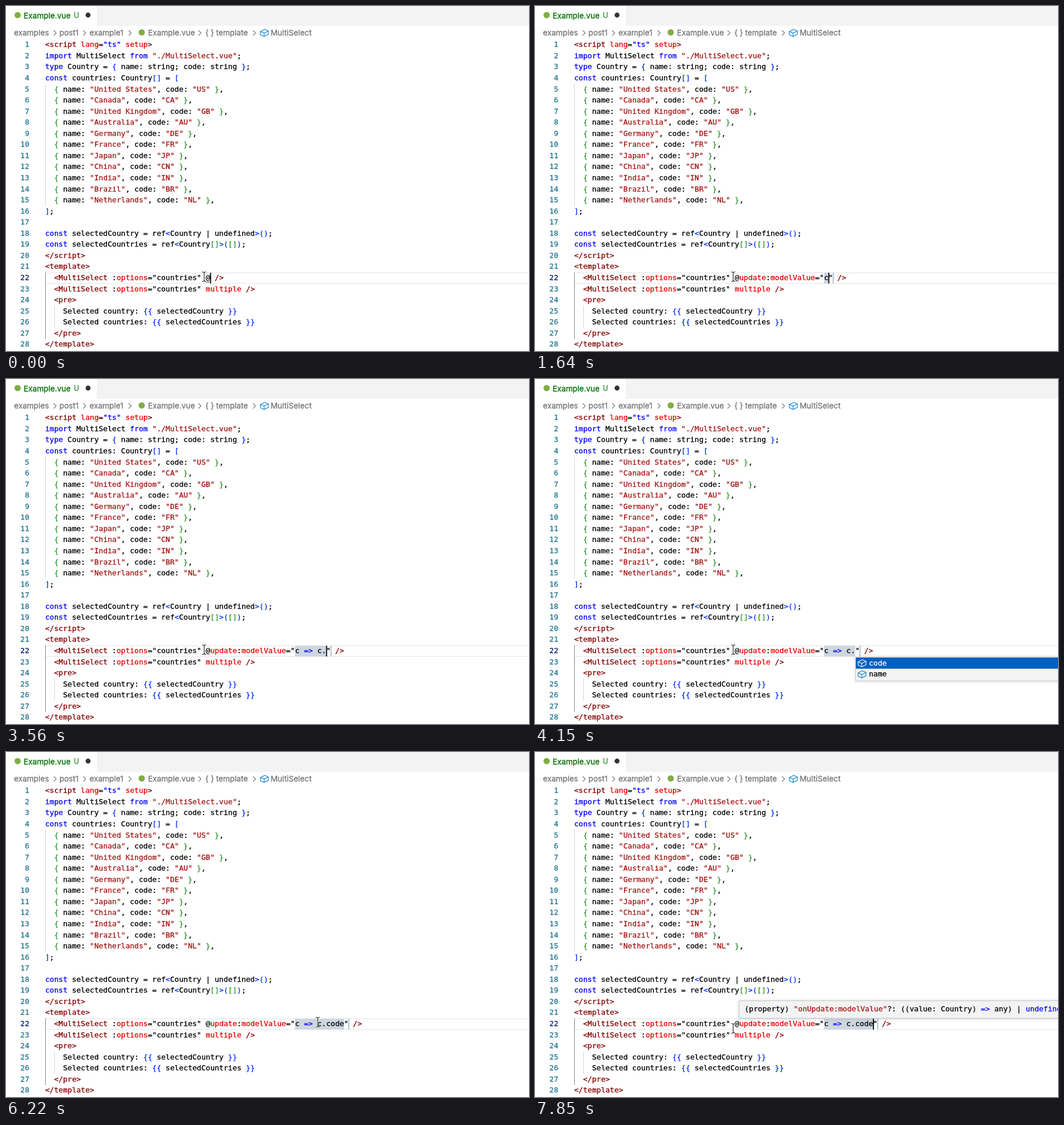
These frames come from a looping animation (921 px wide and 608 px high, 8 s). An HTML page with a canvas:

```html
<!DOCTYPE html>
<html lang="en">
<head>
<meta charset="utf-8">
<title>Code editor</title>
<style>
html, body { margin: 0; width: 100%; height: 100%; overflow: hidden; background: #fff; }
canvas { display: block; }
</style>
</head>
<body>
<canvas id="stage" width="921" height="608"></canvas>
<script>
const g = document.getElementById("stage").getContext("2d");
const LOOP = 8000, PITCH = 19.556, LEFT = 69, SIZE = 13.05, BASE = 13.5;
const MONO = `${SIZE}px "DejaVu Sans Mono", monospace`;
const UI = '13.7px Inter, sans-serif';
const CW = SIZE * .602;
const colX = c => LEFT + c * CW;
const rowY = n => 58.8 + (n - 1) * PITCH;

// "~x" inside a string switches to colour x; h and H are bold
const COLORS = {
  k: "#000", b: "#0000ff", s: "#a31515", t: "#800000", r: "#e50000",
  p: "#0431fa", g: "#319331", w: "#fff", h: "#0066bf", H: "#bbe7ff"
};

const countries = [
  ["United States", "US"], ["Canada", "CA"], ["United Kingdom", "GB"], ["Australia", "AU"],
  ["Germany", "DE"], ["France", "FR"], ["Japan", "JP"], ["China", "CN"],
  ["India", "IN"], ["Brazil", "BR"], ["Netherlands", "NL"]
];
const tagStart = '  ~t<MultiSelect ~k:~roptions~k="countries" ';
const lines = [
  '~t<script ~rlang~k=~b"ts" ~rsetup~t>',
  '~bimport~k MultiSelect ~bfrom ~s"./MultiSelect.vue"~k;',
  '~btype~k Country = ~p{~k name: string; code: string ~p}~k;',
  '~bconst~k countries: Country~p[]~k = ~p[',
  ...countries.map(([name, code]) => `  ~g{~k name: ~s"${name}"~k, code: ~s"${code}"~k ~g}~k,`),
  '~p]~k;',
  '',
  '~bconst~k selectedCountry = ref~p<~kCountry | undefined~p>()~k;',
  '~bconst~k selectedCountries = ref~p<~kCountry~g[]~p>(~g[]~p)~k;',
  '~t<\/script>',
  '~t<template>',
  '',
  tagStart + '~rmultiple~t />',
  '  ~t<pre>',
  '    Selected country: ~p{{~k selectedCountry ~p}}',
  '    Selected countries: ~p{{~k selectedCountries ~p}}',
  '  ~t</pre>',
  '~t</template>'
];

// Timelines: [start ms, value]
const attr = [[0, ""], [150, "u"], [300, "up"], [450, "upd"], [600, "upda"], [750, "updat"], [1190, null]];
const expr = [[0, ""], [1640, "c"], [2370, "c "], [2670, "c ="], [2960, "c =>"], [3110, "c => "],
  [3260, "c => c"], [3560, "c => c."], [5480, "c => c.code"]];
const caretOn = [[0, 1], [4150, 0], [4600, 1], [5190, 0], [5480, 1], [6080, 0], [6660, 1], [7110, 0], [7700, 1]];
const tabError = [[0, 0], [300, 1], [1340, 0]];
const mouse = [[0, [349, 477]], [4740, [400, 486]], [4890, [490, 502]], [5040, [560, 515]], [5190, [585, 520]],
  [5330, [588, 510]], [5480, [589, 505]], [5630, [589, 503]], [5780, [585, 498]], [5930, [572, 488]],
  [6080, [556, 479]], [6220, [549, 476]], [7110, [540, 477]], [7260, [470, 480]], [7400, [400, 484]],
  [7550, [360, 486]], [7700, [349, 487]]];
const popups = [
  [0, null],
  [900, { x: 401, w: 467, icon: bolt, tint: "#d67e00",
    items: ["~H@updat~we:modelValue", "~h@~kvnode~hUpdat~ked", "~h@~kvnodeBefore~hUpdat~ke"] }],
  [1190, null],
  [2230, { x: 517, w: 470, icon: cube, tint: "#007acc",
    items: ["~Hc~wallOnce", "~hc~kallOnce", "~hc~kancelIdleCallback", "~hc~kancelIdleCallback",
      "~hc~klearError", "~hc~klearError"] }],
  [2370, null],
  [3860, { x: 564, w: 470, icon: cube, tint: "#007acc", items: ["~wcode", "~kname"] }],
  [5480, null]
];
const hovers = [
  [0, null],
  [6510, { x: 548, w: 195, text: "(parameter) c: Country" }],
  [7110, null],
  [7700, { x: 359, w: 600,
    text: '(property) ~s"onUpdate:modelValue"~k?: ((value: Country) ~b=>~k any) | ~bundefined' }]
];
const at = (steps, t) => steps.findLast(s => s[0] <= t)[1];

// The hairline outline gives the slightly heavy text smoothing of the editor
function label(s, x, y, color, font = UI) {
  g.font = font;
  g.fillStyle = g.strokeStyle = color;
  g.lineWidth = .3;
  g.fillText(s, x, y);
  g.strokeText(s, x, y);
}

function code(s, x, y) {
  ("~k" + s).split("~").slice(1).forEach(run => {
    const c = run[0], str = run.slice(1);
    label(str, x, y, COLORS[c], (/h/i.test(c) ? "bold " : "") + MONO);
    x += str.length * CW;
  });
}

function rect(x, y, w, h, color) {
  g.fillStyle = color;
  g.fillRect(x, y, w, h);
}

function disc(x, y, r, color) {
  g.fillStyle = color;
  g.beginPath();
  g.arc(x, y, r, 0, 7);
  g.fill();
}

function path(d, x, y, stroke, width = 1.1, fill) {
  const p = new Path2D(d);
  g.save();
  g.translate(x, y);
  if (fill) { g.fillStyle = fill; g.fill(p); }
  g.strokeStyle = stroke;
  g.lineWidth = width;
  g.lineJoin = "round";
  g.stroke(p);
  g.restore();
}

function cube(x, y, color) {
  path("M1 5.5L8.5 1.8L15 4.5V10.5L7.5 14.3L1 11.3ZL7.5 8.3L15 4.5M7.5 8.3V14.3", x, y, color);
}

function bolt(x, y, color) {
  path("M6 1.5H11L8.6 6H12L4 14.5L6 9H3Z", x, y, color);
}

function panel(x, y, w, h) {
  g.save();
  g.shadowColor = "rgba(0,0,0,.16)";
  g.shadowBlur = 6;
  rect(x, y, w, h, "#f3f3f3");
  g.restore();
  g.strokeStyle = "#c8c8c8";
  g.lineWidth = 1;
  g.strokeRect(x + .5, y + .5, w - 1, h - 1);
}

function header(error) {
  const tabW = error ? 173 : 160, ink = error ? "#b01011" : "#007100";
  rect(0, 0, 921, 35, "#f3f3f3");
  rect(0, 0, tabW, 35, "#fff");
  disc(20.5, 16, 5.5, "#7fae42");
  label("Example.vue", 31, 21.5, ink);
  g.globalAlpha = .75;
  label(error ? "1, U" : "U", 119.5, 21, ink, "12.5px Inter, sans-serif");
  g.globalAlpha = 1;
  disc(tabW - 15.5, 16, 4.4, "#333");

  const grey = "#767676";
  [["examples", 14], ["post1", 94], ["example1", 147], ["Example.vue", 250], ["template", 370],
    ["MultiSelect", 466], ["{", 351], ["}", 360.5]].forEach(([s, x]) => label(s, x, 52.3, grey));
  for (const x of [86, 138, 218, 341, 437]) path("M-2 -4.5L2.5 0L-2 4.5", x, 47.5, grey);
  disc(239, 46.5, 5.5, "#7fae42");
  cube(447, 39.5, "#007acc");
}

function pointer(x, y, hand) {
  if (!hand) {
    const beam = "M-3.5 -8.5Q0 -8.5 0 -6Q0 -8.5 3.5 -8.5M0 -6V6M-3.5 8.5Q0 8.5 0 6Q0 8.5 3.5 8.5";
    path(beam, x, y, "#fff", 2.6);
    path(beam, x, y, "#222", 1.2);
    return;
  }
  path("M-3.5 1V-6Q-2.5 -8 -1 -6V-2Q.5 -3.2 1.8 -1.8Q3.2 -2.6 4.3 -1Q6 -1.6 6.6 .4V4Q6.4 6 5 7.5V9H-2V7.5" +
    "Q-4.5 4.5 -6.5 1.5Q-6 -.8 -3.5 1ZM-1 -2V1.5M1.8 -1.5V1.8M4.3 -.8V2", x, y, "#000", 1.1, "#fff");
}

function editor(t) {
  const top = rowY(22), typed = at(attr, t), value = at(expr, t);
  const full = typed === null;
  const plain = full ? `@update:modelValue="${value}` : "@" + typed;
  const caretX = colX(36 + plain.length);

  rect(LEFT, top, 852, 1.5, "#ececec");
  rect(LEFT, top + 18.8, 852, 1.5, "#ececec");
  rect(69, rowY(5), 1, PITCH * 11, "#d3d3d3");
  rect(69, top, 1, PITCH * 6, "#838383");
  rect(85, rowY(25), 1, PITCH * 2, "#d3d3d3");
  if (full) {
    rect(colX(56), top + .5, value.length * CW, 19, "#ced6e0");
    rect(caretX + CW, top + .5, 1, 19, "#738aa6");
  }

  lines.forEach((line, i) => {
    const n = i + 1, y = rowY(n) + BASE;
    code(line, LEFT, y);
    g.textAlign = "right";
    label(n, 41, y, n == 22 ? "#0b216f" : "#237893", MONO);
    g.textAlign = "left";
  });
  const attrCode = full
    ? `@~rupdate~k:~rmodelValue~k="${value.replace("=>", "~b=>~k")}"`
    : `@~r${typed}`;
  code(tagStart + attrCode + "~t />", LEFT, top + BASE);

  if (!full) {
    let d = "M0 2";
    for (let x = 2, up = 1; x <= plain.length * CW; x += 2, up = !up) d += `L${x} ${up ? 0 : 2}`;
    path(d, colX(36), top + 16.5, "#e51400", 1);
  }
  if (at(caretOn, t)) rect(caretX - .3, top + .5, 1.8, 19, "#000");
}

function draw(t) {
  rect(0, 0, 921, 608, "#fff");
  header(at(tabError, t));
  editor(t);

  const popup = at(popups, t);
  if (popup) {
    const { x, w, icon, tint, items } = popup;
    panel(x, 490, w, items.length * PITCH + 3.5);
    rect(x + 1, 491, w - 2, PITCH, "#0060c0");
    items.forEach((item, i) => {
      const y = 491 + i * PITCH;
      icon(x + 4, y + 2, i ? tint : "#fff");
      code(item, x + 24, y + BASE);
    });
  }

  const hover = at(hovers, t);
  if (hover) {
    panel(hover.x, 438, hover.w, 31.5);
    code(hover.text, hover.x + 10, 457);
  }

  const [mx, my] = at(mouse, t);
  pointer(mx, my, popup && mx > popup.x && my > 490);
}

function frame(now) {
  draw(now % LOOP);
  requestAnimationFrame(frame);
}
requestAnimationFrame(frame);
</script>
</body>
</html>
```
